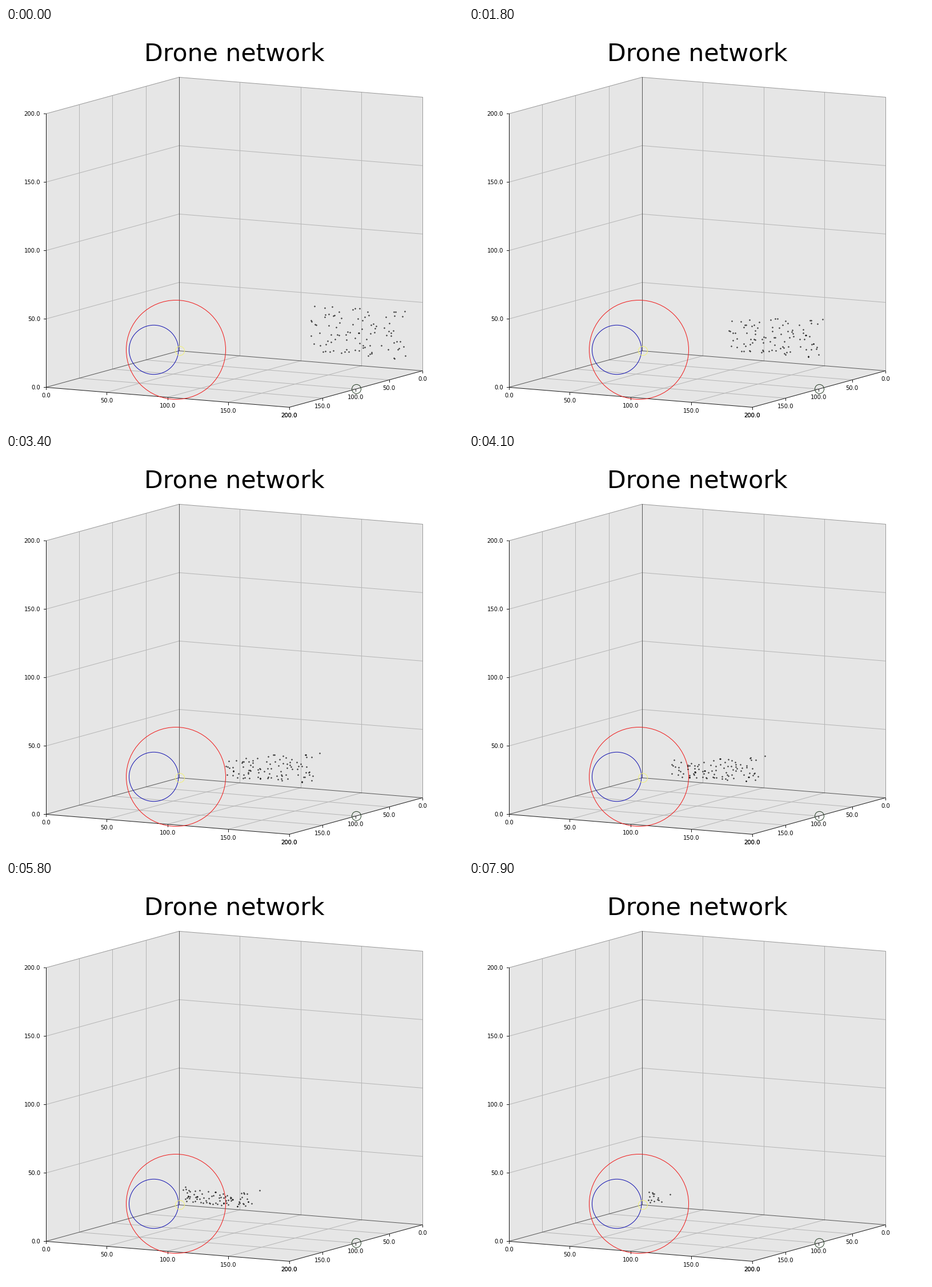
Recreate the animation shown at these times as a matplotlib script. Size 800 by 700 pixels, loop 8 s.

```python
import matplotlib.pyplot as plt
import numpy as np
from matplotlib.animation import FuncAnimation
from matplotlib.collections import PolyCollection
from matplotlib.patches import Circle, Polygon

W, H, DPI = 800, 700, 100
PX = 72 / DPI
FRAMES = 80
SIZE = 200

plt.rcParams["font.family"] = "DejaVu Sans"
fig = plt.figure(figsize=(W / DPI, H / DPI), dpi=DPI, facecolor="white")
ax = fig.add_axes([0, 0, 1, 1])
ax.set_xlim(0, W)
ax.set_ylim(H, 0)
ax.axis("off")

# Parallel projection: screen steps along x, y and z for one unit.
ORIGIN = np.array([302.9, 566.4])
AXES = np.array([[426, 35], [-233, 64], [0, -480]]) / SIZE
DARK, MID, LIGHT, GRID = "#1a1a1a", "#555555", "#999999", "#b5b5b5"


def project(x, y, z):
    return ORIGIN + np.array([x, y, z]) @ AXES


def line(points, color, z=2):
    xs, ys = zip(*points)
    ax.plot(xs, ys, color=color, lw=PX, zorder=z)


def path(corners, color, z=3):
    line([project(*c) for c in corners], color, z)


def label(x, y, text, ha="center", size=10):
    ax.text(x, y, text, ha=ha, va="baseline", fontsize=size * PX, zorder=6)


def ring(x, y, r, color):
    ax.add_patch(Circle((x, y), r, fill=False, ec=color, lw=PX, zorder=5))


def draw_box():
    m = SIZE
    walls = [
        [(0, m, 0), (0, m, m), (0, 0, m), (0, 0, 0)],
        [(0, 0, 0), (0, 0, m), (m, 0, m), (m, 0, 0)],
        [(0, 0, 0), (m, 0, 0), (m, m, 0), (0, m, 0)],
    ]
    for wall in walls:
        ax.add_patch(Polygon([project(*p) for p in wall], fc="#e6e6e6", lw=0, zorder=1))

    for v in (50, 100, 150):
        path([(v, 0, m), (v, 0, 0)], GRID, 2)
        path([(v, 0, 0), (v, m, 0)], GRID, 2)
        path([(0, v, m), (0, v, 0)], GRID, 2)
        path([(0, v, 0), (m, v, 0)], GRID, 2)
        path([(0, m, v), (0, 0, v)], GRID, 2)
        path([(0, 0, v), (m, 0, v)], GRID, 2)

    path([(0, m, m), (0, 0, m)], LIGHT)
    path([(0, 0, m), (m, 0, m)], LIGHT)
    path([(m, 0, m), (m, 0, 0)], LIGHT)
    for end in [(m, 0, 0), (0, m, 0), (0, 0, m)]:
        path([(0, 0, 0), end], MID)
    path([(0, m, 0), (0, m, m)], DARK, 4)
    path([(0, m, 0), (m, m, 0)], DARK, 4)
    path([(m, m, 0), (m, 0, 0)], DARK, 4)

    for v in range(0, m + 1, 50):
        text = f"{v:.1f}"
        x, y = project(0, m, v)
        line([(x - 4, y), (x, y)], DARK)
        label(60, y + 4, text, "right")
        for x, y in (project(v, m, 0), project(m, v, 0)):
            line([(x, y), (x, y + 4)], DARK)
            label(x, y + 18, text)


draw_box()
label(242, 57, "Drone network", "left", 42.67)
ring(297.5, 564.5, 87, "#f01818")
ring(258.7, 564.5, 43.2, "#1010b0")
ring(613.5, 633.4, 8, "#263d26")
ring(304.5, 566.5, 8, "#f2f277")

# The swarm starts in a block slanted along the x axis.
DRONES = 95
LEFT, RIGHT = 534, 700
DRIFT = AXES[0, 1] / AXES[0, 0]
GOAL_X, GOAL_Y = 303, 566
LEVEL_X = 388      # drones stop descending here
LANDED_X = 309     # and disappear here

rng = np.random.default_rng(7)
across = rng.uniform(0, 1, DRONES)
x0 = LEFT + (RIGHT - LEFT) * across
y0 = rng.uniform(484, 570, DRONES) + DRIFT * (x0 - LEFT)
speed = rng.uniform(4.0, 4.6, DRONES) + 0.35 * across
slope = (y0 - GOAL_Y) / (x0 - GOAL_X)

DIAMOND = np.array([(1, 0), (0, 1), (-1, 0), (0, -1)])
swarm = PolyCollection([], facecolors="none", edgecolors="black",
                       linewidths=0.7 * PX, zorder=7)
ax.add_collection(swarm, autolim=False)


def update(n):
    x = x0 - speed * n
    turn = np.maximum(x, LEVEL_X)
    y = GOAL_Y + slope * (turn - GOAL_X) - DRIFT * (turn - x)
    flying = x > LANDED_X
    centers = np.floor(np.column_stack([x, y])[flying]) + 0.5
    swarm.set_verts(centers[:, None] + DIAMOND)
    return swarm,


anim = FuncAnimation(fig, update, frames=FRAMES, interval=100, repeat=True, repeat_delay=0)
plt.show()
```
